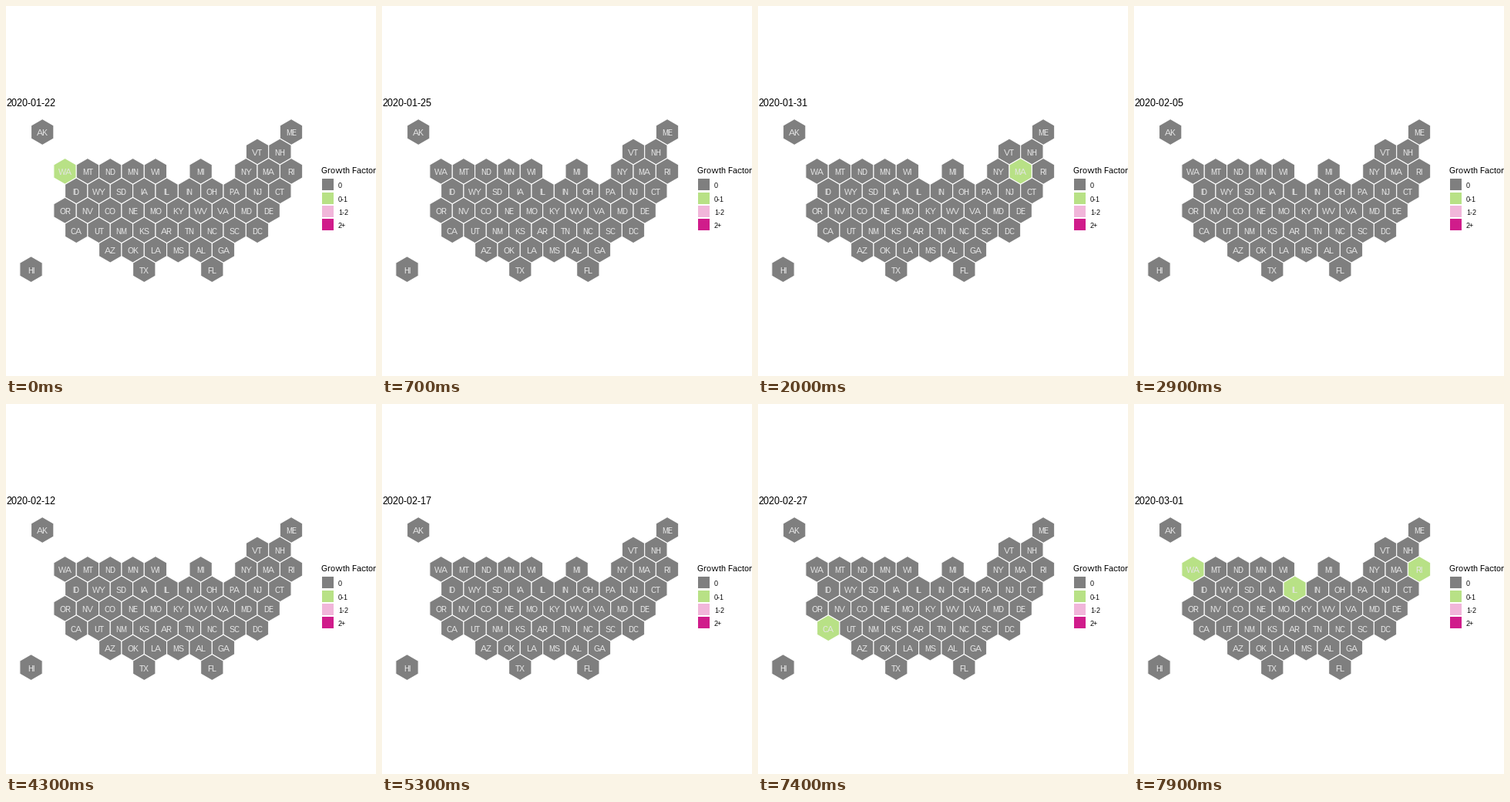
Animation of 480 by 480 pixels, one loop 8000 ms. Source, as a matplotlib script:

```python
import matplotlib.pyplot as plt
import numpy as np
from matplotlib.animation import FuncAnimation
from matplotlib.patches import Polygon, Rectangle

plt.rcParams.update({
    "font.family": "Liberation Sans",
    "text.hinting": "native",
    "text.hinting_factor": 1,
    "toolbar": "None",
})

SIZE = 480
STEP_MS = 100
FRAMES = 80
GREY, GREEN, PINK, MAGENTA = "#7F7F7F", "#B8E186", "#F1B6DA", "#D01C8B"
LABEL = "#E5E5E5"

# Hexagon grid: x offset in columns, then states left to right ("-" is a gap)
PITCH = 29.35
ROW_H = 25.45
X0, Y0 = 47.2, 163.5
ROWS = [
    (0, "AK - - - - - - - - - - ME"),
    (9.5, "VT NH"),
    (1, "WA MT ND MN WI - MI - NY MA RI"),
    (1.5, "ID WY SD IA IL IN OH PA NJ CT"),
    (1, "OR NV CO NE MO KY WV VA MD DE"),
    (1.5, "CA UT NM KS AR TN NC SC DC"),
    (3, "AZ OK LA MS AL GA"),
    (-0.5, "HI - - - - TX - - FL"),
]

# Days since the start on which states have a growth factor of 0-1
GROWTH = {
    0: "WA", 2: "IL", 4: "AZ CA", 5: "CA", 7: "CA", 8: "IL", 9: "CA",
    10: "MA", 12: "CA", 20: "CA", 22: "CA", 27: "CA", 30: "CA", 33: "CA",
    35: "CA", 37: "CA", 38: "CA WA OR", 39: "WA IL RI",
}
START = np.datetime64("2020-01-22")

fig = plt.figure(figsize=(SIZE / 72, SIZE / 72), dpi=72, facecolor="white")
ax = fig.add_axes([0, 0, 1, 1])
ax.set_xlim(0, SIZE)
ax.set_ylim(SIZE, 0)
ax.axis("off")


def write(x, y, s, size, color="black", ha="left"):
    return ax.text(x, y, s, fontsize=size, color=color, ha=ha, va="baseline")


def hexagon(cx, cy):
    angles = np.radians(np.arange(30, 390, 60))
    r = PITCH / np.sqrt(3)
    points = np.column_stack([cx + r * np.cos(angles), cy + r * np.sin(angles)])
    return ax.add_patch(Polygon(points, fc=GREY, ec="white", lw=1.07))


hexes = {}
for row, (offset, names) in enumerate(ROWS):
    for col, name in enumerate(names.split()):
        if name == "-":
            continue
        cx, cy = X0 + PITCH * (offset + col), Y0 + ROW_H * row
        hexes[name] = hexagon(cx, cy)
        write(cx, cy + 5, name, 11, LABEL, "center")

write(409, 217, "Growth Factor", 11)
KEYS = [("0", GREY), ("0-1", GREEN), ("1-2", PINK), ("2+", MAGENTA)]
for i, (name, color) in enumerate(KEYS):
    top = 224.5 + 17.28 * i
    ax.add_patch(Rectangle((410, round(top)), 15, 15, fc=color, lw=0))
    write(431, round(top + 12), name, 9)

title = write(0, 130, str(START), 13)


def update(frame):
    # Colours move on one frame ahead of the date
    active = GROWTH.get(frame // 2, "").split()
    for name, patch in hexes.items():
        patch.set_facecolor(GREEN if name in active else GREY)
    title.set_text(str(START + max(0, (frame - 1) // 2)))
    return [title, *hexes.values()]


anim = FuncAnimation(fig, update, frames=FRAMES, interval=STEP_MS,
                     repeat=True, repeat_delay=0, blit=False)
plt.show()
```
